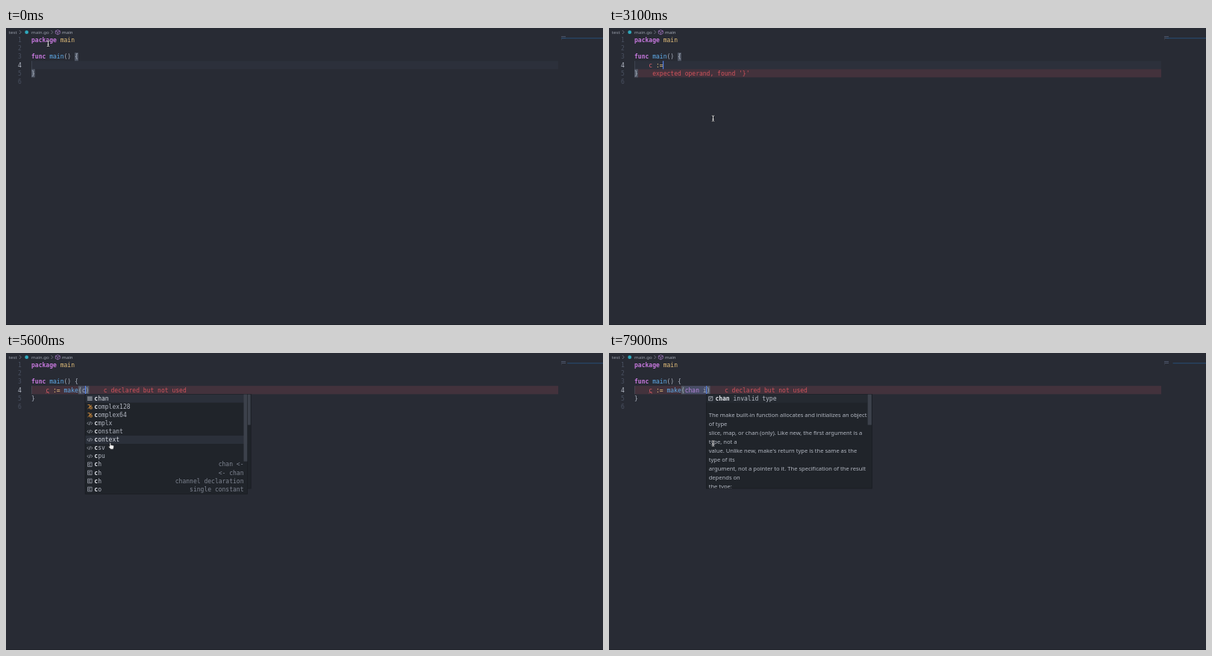
An HTML page for the animation above (8 s loop, 800 px wide and 399 px high).

```html
<!DOCTYPE html>
<html lang="en">
<head>
<meta charset="utf-8">
<title>Go editor</title>
<style>
  html, body { margin: 0; width: 100%; height: 100%; overflow: hidden; background: #282b34; }
  svg { display: block; width: 100vw; height: 100vh; }
  text { white-space: pre; font: 8.03px "DejaVu Sans Mono", monospace; }
  text.ui { font: 6.15px "Noto Sans", sans-serif; }
  text.doc { font: 7.59px "Noto Sans", sans-serif; }
  .bold { font-weight: bold; }
</style>
</head>
<body>
<svg id="stage" viewBox="0 0 800 399"></svg>
<script>
const LOOP = 8000, STEP = 100;
const CHAR = 4.834, ROW = 11.07, LEFT = 34, TOP = 11, RIGHT = 740;
const POPUP_TOP = 55.6, LIST_WIDTH = 217.5, HELP_WIDTH = 222;
const C = {
  text: '#abb2bf', dim: '#7f8592', purple: '#c678dd', blue: '#61afef', gold: '#e5c07b',
  red: '#d9606b', error: '#d2535c', errorRow: '#43323c', row: '#2c303b', match: '#515866',
  popup: '#20242a', border: '#191c21', selected: '#2b303a', thumb: '#3c414b'
};

// Each edit: time, text left of the caret, text right of it.
const edits = [
  [-500, '', ''], [1000, 'c', ''], [1800, 'c ', ''], [1900, 'c :', ''], [2100, 'c :=', ''],
  [2300, 'c := ', ''], [2500, 'c := m', ''], [2900, 'c :=', ''], [3200, 'c := ', ''],
  [3800, 'c := m', ''], [3900, 'c := ma', ''], [4700, 'c := make(', ''],
  [5200, 'c := make(', ')'], [5500, 'c := make(c', ')'], [6400, 'c := make(ch', ')'],
  [7300, 'c := make(chan', ')'], [7700, 'c := make(chan ', ')'], [7900, 'c := make(chan i', ')']
];
const unused = 'c declared but not used';
const errors = [
  [0], [1200, 4, 'undeclared name: c'], [1800], [2300, 5, "expected operand, found '}'"],
  [2500], [2900, 5, "expected operand, found '}'"], [3800], [4000, 4, unused], [4700],
  [5500, 4, unused], [7400, 4, "expected type, found ')'"], [7900, 4, unused]
];
// Rows: icon kind, label, optional detail after "~".
const rowsC = 'k const|f cap|f close|f complex|t complex128|t complex64|f copy|m cipher|m context|m crc32|m crc64|m cpu';
const rowsM = 'w make|m macho|m mail|m maphash|m math|m math|f main|s main~main function|s make~make(...)|s map~map declaration';
const rowsCh = 'k chan|t complex128|t complex64|m cmplx|m constant|m context|m csv|m cpu|s ch~chan <-|s ch~<- chan|s ch~channel declaration|s co~single constant';
const lists = [
  [0], [1100, 5, 1, rowsC, 80], [1800], [2500, 10, 1, rowsM + '|m mime|m multipart', 60], [2900],
  [4000, 11, 2, rowsM], [4700], [5500, 15, 1, rowsCh, 90], [6300]
];
const helps = [[0], [4800, 14], [5500, 15], [7300, 18], [7700, 19], [7900, 20]];
const helpText = [
  'The make built-in function allocates and initializes an object', 'of type',
  'slice, map, or chan (only). Like new, the first argument is a', 'type, not a',
  "value. Unlike new, make's return type is the same as the", 'type of its',
  'argument, not a pointer to it. The specification of the result', 'depends on', 'the type:'
];

const at = (track, t) => track.filter(s => s[0] <= t).pop();
const colX = col => LEFT + col * CHAR;
const rowY = line => TOP + (line - 1) * ROW;
const esc = s => s.replace(/&/g, '&amp;').replace(/</g, '&lt;');
const rect = (x, y, w, h, fill, extra = '') =>
  `<rect x="${x}" y="${y}" width="${w}" height="${h}" fill="${fill}" ${extra}/>`;
const path = (d, stroke, width = 0.7, fill = 'none') =>
  `<path d="${d}" stroke="${stroke}" stroke-width="${width}" fill="${fill}"/>`;
const text = (x, y, s, fill = C.text, cls = '', anchor = 'start') =>
  `<text x="${x}" y="${y}" fill="${fill}" class="${cls}" text-anchor="${anchor}">${esc(s)}</text>`;
const move = (x, y, body) => `<g transform="translate(${x} ${y})">${body}</g>`;
const code = (line, col, s, fill, cls) => text(colX(col), rowY(line) + 8.3, s, fill, cls);
const bracketBox = (line, col) => rect(colX(col), rowY(line), CHAR, ROW, C.match);

function squiggle(col, length) {
  let d = `M${colX(col)} 54`;
  for (let i = 0; i < length * 2; i++) d += `l1.2 ${i % 2 ? 1 : -1}l1.2 0`;
  return path(d, C.error, 0.7);
}

const cube = color =>
  path('M0-3L3-1.6V1.7L0 3.2L-3 1.7V-1.6ZM-3-1.6L0 0L3-1.6M0 0V3.2', color);

const icons = {
  f: cube('#a97ac9'),
  w: cube('#b9bec8'),
  k: path('M-3.3-2H3.3M-3.3 0H3.3M-3.3 2H3.3', '#b9bec8', 1),
  t: path('M-2.8-2.6H0V0H2.8V2.6H0V0M-2.8 2.6L2.8-2.6', '#d8903c', 0.9),
  m: path('M-1.7-1.8L-3.4 0L-1.7 1.8M1.7-1.8L3.4 0L1.7 1.8M.8-2.4L-.8 2.4', '#b9bec8'),
  s: path('M-2.8-2.8H2.8V2.8H-2.8ZM1.2-1.2H-1.2V1.2H1.2', '#a8adb8'),
  v: path('M-2.6-2.6H2.6V2.6H-2.6ZM-2.6 2.6L2.6-2.6M-1.5-1H0', '#b9bec8')
};

function breadcrumbs() {
  const chevron = x => path(`M${x} 3.2l2.2 2.4l-2.2 2.4`, '#8a909c', 0.7);
  return text(3.8, 8, 'test', '#969ca8', 'ui') + chevron(18) +
    '<circle cx="27.7" cy="5.7" r="2.4" fill="#2fa9bd"/>' +
    text(34, 8, 'main.go', '#969ca8', 'ui') + chevron(60.5) +
    move(69.3, 5.6, cube('#a97ac9')) + text(75, 8, 'main', '#a4aab6', 'ui');
}

function minimap(length) {
  const x = 744 + length * 0.68;
  return rect(744, 11.2, 6, 0.8, '#566078') + rect(744, 13.2, 6, 0.8, '#566078') +
    rect(744, 15.2, 1, 0.6, '#4a5060') + rect(x, 13.3, 800 - x, 0.9, '#27527c');
}

function statement(before, after, error) {
  const all = before + after;
  let out = '';
  if (after) out += bracketBox(4, 13) + bracketBox(4, 4 + before.length);
  const open = all.indexOf('(');
  const arg = open < 0 ? '' : before.slice(open + 1);
  if (arg) out += rect(colX(14), rowY(4), arg.length * CHAR, ROW, '#484d66');
  if (all === 'c') out += rect(colX(4) + 0.5, 46.5, CHAR - 1, 6.5, 'none', `stroke="${C.red}" stroke-width=".5"`);
  out += code(4, 4, all.slice(0, 1), C.red);
  out += code(4, 6, all.slice(2, 4), C.gold);
  out += code(4, 9, all.slice(5, 9), open < 0 ? '#8f7f92' : C.blue);
  if (open > 0) {
    const keyword = arg.startsWith('chan') ? 4 : 0;
    out += code(4, 13, '(') + code(4, 14, arg.slice(0, keyword), '#b884dc') +
      code(4, 14 + keyword, arg.slice(keyword) + after, C.text);
  }
  if (error === 4) {
    out += squiggle(4, 1);
    if (all.endsWith('ma')) out += squiggle(9, 2);
  }
  return out;
}

function suggestions([, col, matched, rows, thumb]) {
  if (!rows) return '';
  const x = colX(col), items = rows.split('|');
  let out = rect(x - 0.4, POPUP_TOP, LIST_WIDTH, items.length * ROW + 1, C.popup,
    `stroke="${C.border}" stroke-width=".7"`);
  items.forEach((item, i) => {
    const [label, detail] = item.slice(2).split('~');
    const y = POPUP_TOP + i * ROW, base = y + 8.3;
    if (i === 0 || i === 5) out += rect(x, y, LIST_WIDTH - 0.8, ROW, C.selected);
    out += move(x + 5.8, y + 5.6, icons[item[0]]);
    out += text(x + 11.8, base, label.slice(0, matched), '#e3e6ec', 'bold');
    out += text(x + 11.8 + matched * CHAR, base, label.slice(matched), i === 0 || i === 5 ? '#d5d9e1' : '#b0b5c0');
    if (detail) out += text(x + LIST_WIDTH - 5.5, base, detail, C.dim, '', 'end');
  });
  if (thumb) out += rect(x + LIST_WIDTH - 5.5, POPUP_TOP, 4.8, thumb, C.thumb);
  if (col === 11) {
    const left = x + LIST_WIDTH;
    out += rect(left, POPUP_TOP, 166, 22.5, C.popup, `stroke="${C.border}" stroke-width=".7"`) +
      text(left + 2.3, 66, 'func(t Type, size ...int) Type', '#8b919d') +
      path(`M${left + 157.5} 60.5l3.4 3.4m0-3.4l-3.4 3.4`, '#9aa0ac', 0.7);
  }
  return out;
}

function signature([, col], t) {
  if (!col) return '';
  const x = colX(col);
  let out = rect(x - 0.3, POPUP_TOP, HELP_WIDTH, 126.4, C.popup, `stroke="${C.border}" stroke-width=".7"`);
  if (t < 7300) {
    out += text(x + 3, 64, 'make(t Type, size ...int) Type', C.text);
  } else {
    out += rect(x, POPUP_TOP, HELP_WIDTH - 6, ROW, '#252a31') + move(x + 5.5, 61.2, icons.v) +
      text(x + 11.7, 64, 'chan', '#e3e6ec', 'bold') +
      text(x + 11.7 + 5 * CHAR, 64, 'invalid type', '#b6bbc5');
  }
  out += '<g clip-path="url(#help)">' +
    helpText.map((s, i) => text(x + 3, 85.5 + i * 12.02, s, '#b2b7c1', 'doc')).join('') + '</g>';
  return out + rect(x + HELP_WIDTH - 6, POPUP_TOP, 5.2, 41, C.thumb);
}

function pointer(t, overList) {
  const k = Math.min(1, Math.max(0, (t - 100) / 1000));
  const ease = k * k * (3 - 2 * k);
  const x = 56.5 + 83 * ease, y = 21 + 100.5 * ease;
  if (overList) {
    return move(x + 1.5, y + 3.5, path(
      'M-2-4.2Q-1-4.9-.5-4V-1.4L2.8-.8Q3.8-.4 3.5.9L2.8 4.2H-.8L-3.5 1Q-3.4-.2-2 .4Z',
      '#15171b', 0.5, '#f4f4f4'));
  }
  const beam = 'M-1.6-3.7Q0-3.7 0-2.8V2.8Q0 3.7-1.6 3.7M1.6-3.7Q0-3.7 0-2.8M0 2.8Q0 3.7 1.6 3.7M-1 1H1';
  return move(x, y, path(beam, '#15171b', 1.9) + path(beam, '#f0f0f0', 0.9));
}

function bulb() {
  return '<circle cx="38.3" cy="47.5" r="2.8" fill="#f5c518"/>' +
    rect(37, 49.5, 2.6, 1.7, '#f5c518') + rect(37.2, 51.5, 2.2, 0.9, '#c5cad3');
}

function render(t) {
  const [edited, before, after] = at(edits, t);
  const [, errorLine, message] = at(errors, t);
  const list = at(lists, t);
  const length = before.length + after.length;
  let out = '<defs><clipPath id="help"><rect y="70" width="800" height="111.5"/></clipPath></defs>';
  out += rect(0, 0, 800, 399, '#282b34') + rect(0, 398, 800, 1, '#20232b');
  out += breadcrumbs() + minimap(length);
  out += rect(LEFT, rowY(4), RIGHT - LEFT, ROW, C.row);
  if (errorLine) out += rect(LEFT, rowY(errorLine), RIGHT - LEFT, ROW, C.errorRow);
  out += rect(LEFT, rowY(4), 0.6, ROW, '#4a505e');
  for (let n = 1; n <= 6; n++) {
    out += text(20.8, rowY(n) + 8.3, String(n), n === 4 ? '#b4bac6' : '#495060', '', 'end');
  }
  if (!after) out += bracketBox(3, 12) + bracketBox(5, 0);
  out += code(1, 0, 'package', C.purple, 'bold') + code(1, 8, 'main', C.gold);
  out += code(3, 0, 'func', C.purple, 'bold') + code(3, 5, 'main', C.blue) + code(3, 9, '() {');
  out += code(5, 0, '}') + statement(before, after, errorLine);
  if (message) {
    const end = errorLine === 4 ? 4 + length : 1;
    out += text(colX(end) + 19.4, rowY(errorLine) + 8.3, message, C.error);
  }
  if (list[1] === 11) out += bulb();
  if ((t - edited) % 1000 < 500) out += rect(colX(4 + before.length) - 0.5, rowY(4), 1, ROW, '#5c8dff');
  out += signature(at(helps, t), t) + suggestions(list) + pointer(t, list[1] && t > 1100);
  return out;
}

const stage = document.getElementById('stage');
const start = performance.now();
let shown = -1;
function tick() {
  const t = Math.floor(((performance.now() - start) % LOOP) / STEP) * STEP;
  if (t !== shown) stage.innerHTML = render(shown = t);
  requestAnimationFrame(tick);
}
tick();
</script>
</body>
</html>
```
